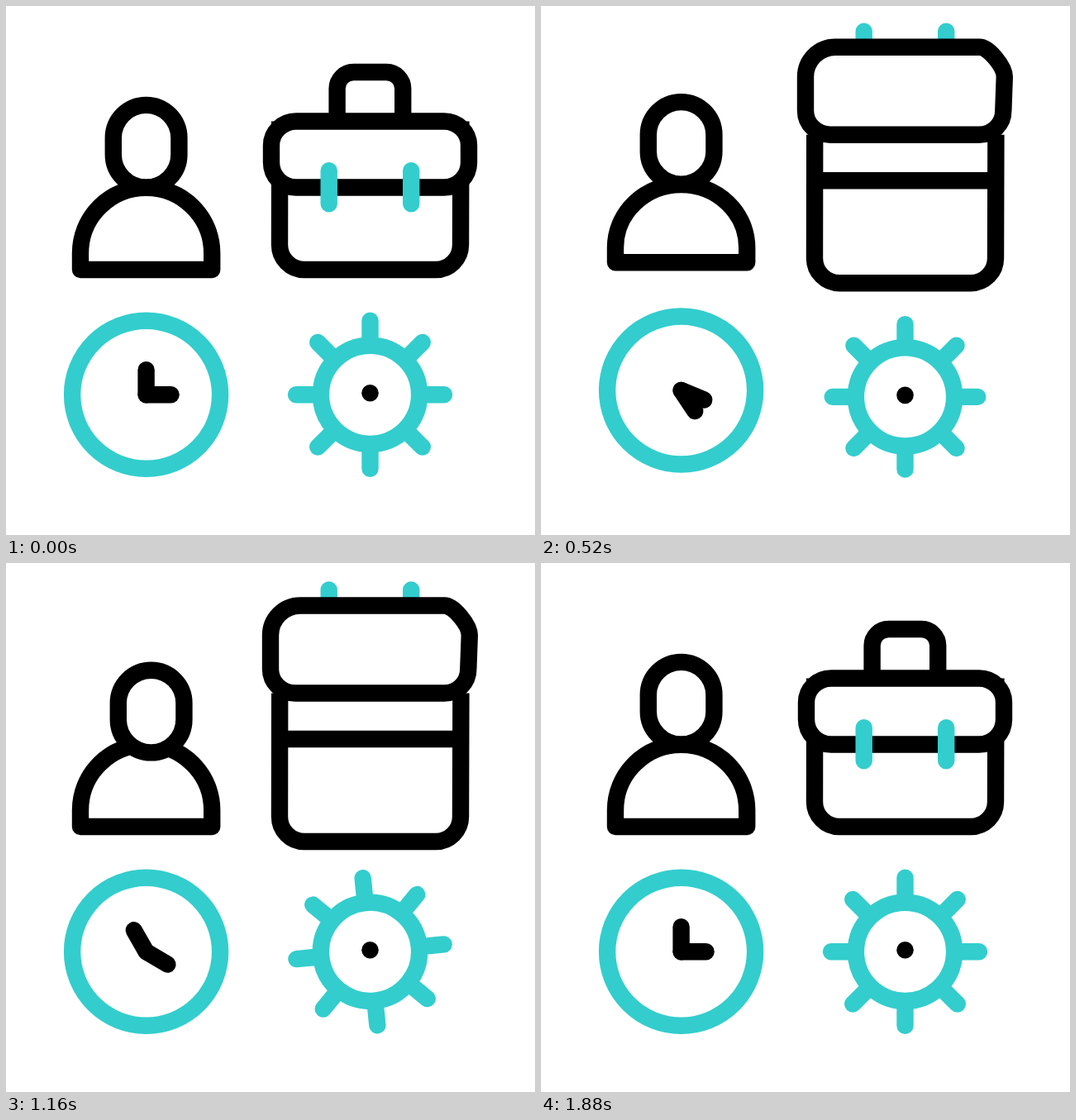
Recreate the animation shown at these times as an HTML page. Size 640 px wide and 640 px high, loop 2000 ms.

```html
<!DOCTYPE html>
<html lang="en">
<head>
<meta charset="utf-8">
<title>Work icons</title>
<style>
  html, body { margin: 0; width: 100%; height: 100%; overflow: hidden; background: #fff; }
  svg { display: block; width: 100%; height: 100%; }
  .ink, .teal { fill: none; stroke: #000; stroke-width: 20.4; stroke-linecap: round; stroke-linejoin: round; }
  .teal { stroke: #33cdcd; }
  .solid { fill: #fff; }
  .butt { stroke-linecap: butt; }
</style>
</head>
<body>
<svg viewBox="0 0 640 640">
  <path id="torso" class="ink"/>
  <rect id="head" class="ink solid" x="129.8" y="119.9" width="79.6" height="99.6" rx="39.8"/>

  <g id="bag">
    <path class="ink butt" d="M400.6 139.5V100a20 20 0 0 1 20-20h39.6a20 20 0 0 1 20 20v39.5"/>
    <path class="ink butt" d="M331.2 139.5L331 289a30 30 0 0 0 30 30H520a30 30 0 0 0 30-30L550.4 139.5M331 195H550"/>
    <path id="pinsBack" class="teal"/>
    <path id="flap" class="ink solid"/>
    <path id="pinsFront" class="teal"/>
  </g>

  <g id="clock">
    <circle class="teal" r="89.5"/>
    <path id="minute" class="ink" d="M0 0V-30"/>
    <path id="hour" class="ink" d="M0 0V-30"/>
  </g>

  <g id="gear">
    <g id="wheel">
      <path id="spokes" class="teal"/>
      <circle class="teal solid" r="59.6"/>
    </g>
    <circle cy="-2" r="10.3"/>
  </g>
</svg>
<script>
const LOOP = 2000, STEP = 40;
const $ = id => document.getElementById(id);
const set = (id, name, value) => $(id).setAttribute(name, value);
const clamp = x => Math.min(1, Math.max(0, x));
const mix = (a, b, p) => a + (b - a) * p;
const smooth = x => x * x * (3 - 2 * x);
const span = (t, from, to) => clamp((t - from) / (to - from));

// Eased value through [time, value] keys
function track(t, keys) {
  for (let i = 1; i < keys.length; i++) {
    const [t0, a] = keys[i - 1], [t1, b] = keys[i];
    if (t < t1) return mix(a, b, smooth(span(t, t0, t1)));
  }
  return keys[keys.length - 1][1];
}

// Shared bounce: out to the peak, past rest, back to rest
const bounce = (t, peak, over) => track(t, [[80, 0], [340, peak], [600, over], [840, 0]]);

function drawPerson(t) {
  const top = bounce(t, -44.5, 8.1), base = bounce(t, -38.5, 0);
  const shoulder = 299 + mix(base, top, 0.4), crown = 219.7 + top, foot = 319 + base;
  set('torso', 'd', `M90 ${foot}V${shoulder}A79.6 ${shoulder - crown} 0 0 1 249.2 ${shoulder}V${foot}Z`);
  const nod = track(t, [[860, 0], [1340, 1], [1480, 1], [1850, 0]]);
  set('head', 'transform', `translate(${8.8 * nod} ${top + 14.4 * nod})`);
}

function flapPath(fold) {
  const shut = Math.min(fold, 1), open = Math.max(0, fold - 1);
  const hinge = 139.5;
  const far = open ? mix(155, 33.5, open) : mix(219.5, 155, shut);
  const height = Math.abs(far - hinge), dir = Math.sign(far - hinge);
  const near = hinge + dir * Math.min(29, height * 0.55);
  const edge = far - dir * Math.min(30 + 6 * open, height * 0.45);
  const left = 321 - open, right = 560, farRight = right + 0.8 * open;
  const rx = 30 + 6 * open, k = 0.45, kr = 0.45 + 0.2 * open;
  return `M${left + 30} ${hinge}H${right - 30}
    C${right - 30 * k} ${hinge} ${right - 0.7 * open} ${mix(hinge, near, k)} ${right - 0.7 * open} ${near}
    L${farRight} ${edge}
    C${farRight} ${mix(far, edge, kr)} ${farRight - 30 * kr} ${far} ${farRight - 30} ${far}
    H${left + rx}
    C${left + rx * k} ${far} ${left} ${mix(far, edge, k)} ${left} ${edge}
    V${near}C${left} ${mix(hinge, near, k)} ${left + 30 * k} ${hinge} ${left + 30} ${hinge}Z`;
}

function drawBag(t) {
  // fold: 0 closed, 1 flat, 2 flipped open; the pins open a little later
  const closing = [[1220, 2], [1510, 1], [1750, 0]];
  const fold = track(t, [[80, 0], [220, 1], [380, 2], ...closing]);
  const pin = track(t, [[80, 0], [220, 1], [430, 2], ...closing]);
  set('bag', 'transform', `translate(0 ${18 * Math.min(fold, 1) + bounce(t, -32, 7)})`);
  set('flap', 'd', flapPath(fold));

  const behind = pin > 1;
  const mid = behind ? mix(142.4, 14.5, pin - 1) : mix(219.2, 142.4, pin);
  const half = 20 * Math.max(0, 1 - pin * 1.14);
  const from = mid - half, to = behind ? mid + 30 * (pin - 1) : mid + half + 0.01;
  const pins = [390.7, 490.2].map(x => `M${x} ${from}V${to}`).join('');
  set('pinsBack', 'd', behind ? pins : '');
  set('pinsFront', 'd', behind ? '' : pins);
}

function drawClock(t) {
  const turn = smooth(span(t, 80, 1840));
  set('clock', 'transform', `translate(169.6 ${470.3 + bounce(t, 26, -14.4)})`);
  set('minute', 'transform', `rotate(${720 * turn})`);
  set('hour', 'transform', `rotate(${90 + 360 * turn})`);
}

function drawGear(t) {
  const x = span(t, 728, 1825);
  const angle = 360 * smooth(x + 0.047 * x * (1 - x));
  const tip = 89.5 + bounce(t, 14, -6.3);
  let d = '';
  for (let i = 0; i < 8; i++) {
    const c = Math.cos(i * Math.PI / 4), s = Math.sin(i * Math.PI / 4);
    d += `M${60 * c} ${60 * s}L${tip * c} ${tip * s}`;
  }
  set('gear', 'transform', `translate(440.5 ${470.3 + bounce(t, -13, 7.1)})`);
  set('wheel', 'transform', `rotate(${angle})`);
  set('spokes', 'd', d);
}

function draw() {
  const t = Math.floor(performance.now() % LOOP / STEP) * STEP;
  drawPerson(t);
  drawBag(t);
  drawClock(t);
  drawGear(t);
  requestAnimationFrame(draw);
}
draw();
</script>
</body>
</html>
```
